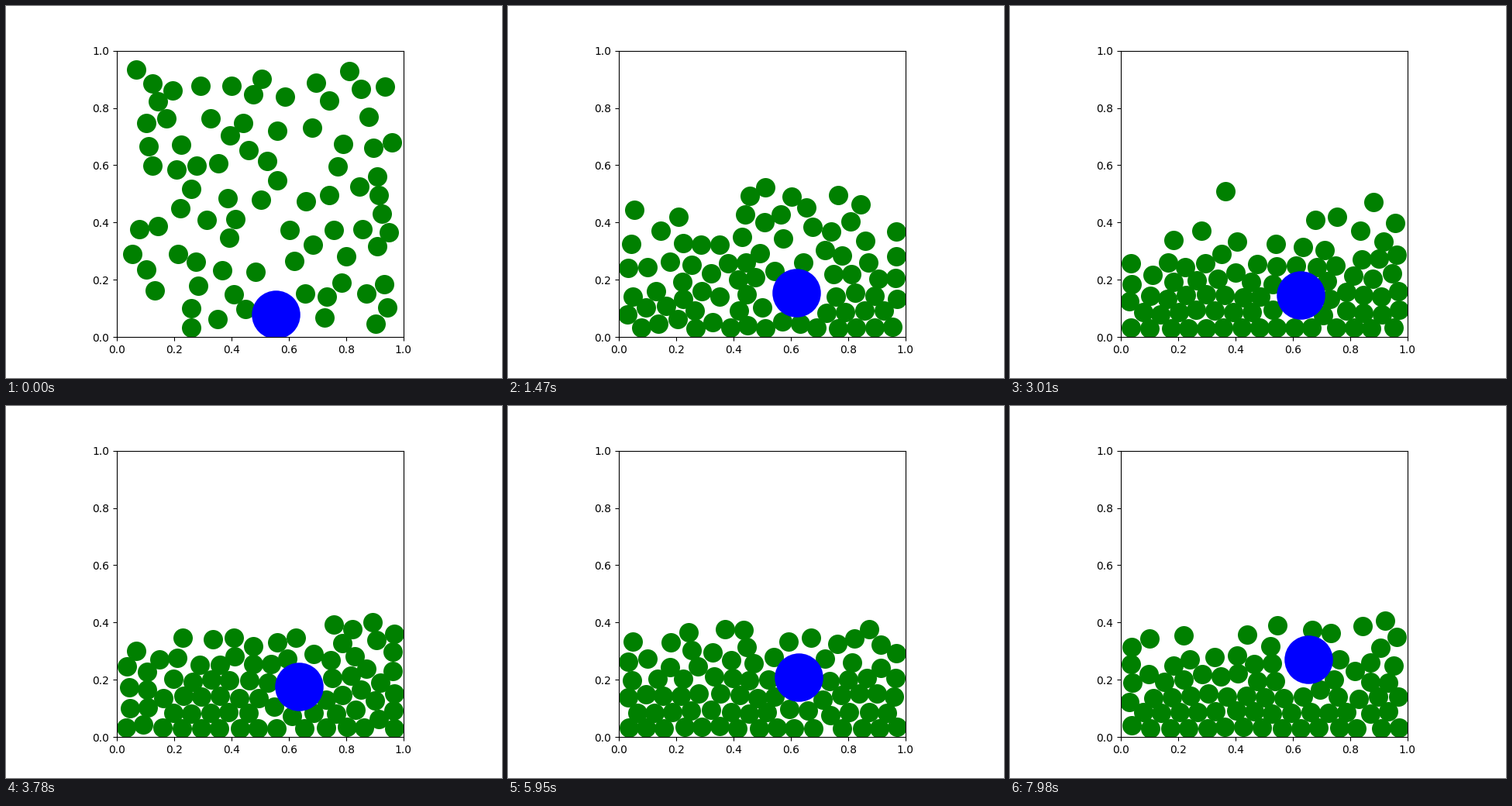
Animation of 640 by 480 pixels, one loop 8 s. Source, as a matplotlib script:

```python
import math

import numpy as np
import matplotlib.pyplot as plt
from matplotlib.animation import FuncAnimation

LOOP, TICK, HOLD = 8000, 20, 70      # ms: loop, timer, time per pose
POSES = LOOP // HOLD + 1
SUB = 10                             # physics substeps per pose
COUNT = 79                           # small balls
GRAVITY = 0.0031                     # box heights per pose squared
HEAT = 0.00011                       # mean squared speed the bed is kept at
LOSSY, LIVELY = 0.88, 1.08           # restitution of a hot and a cold bed
SMALL, BIG = 0.03, 0.075             # collision radii
CEILING = 0.94

# Climb of the big ball: pose, x, y
CLIMB = [(0, 0.555, 0.078), (21, 0.620, 0.154), (43, 0.626, 0.146),
         (65, 0.642, 0.208), (85, 0.628, 0.208), (101, 0.666, 0.270),
         (114, 0.653, 0.270)]


def big_ball(t):
    for (t0, x0, y0), (t1, x1, y1) in zip(CLIMB, CLIMB[1:]):
        if t <= t1:
            break
    u = min((t - t0) / (t1 - t0), 1)
    s = (1 - math.cos(math.pi * u)) / 2
    wobble = 0.004 * math.sin(6 * math.pi * u)
    return complex(x0 + (x1 - x0) * s, y0 + (y1 - y0) * s + wobble)


def scatter(rng, centre):
    """Random spots in the box that touch neither each other nor the big ball."""
    spots = []
    while len(spots) < COUNT:
        spot = complex(rng.uniform(0.045, 0.965), rng.uniform(SMALL, CEILING))
        free = all(abs(spot - other) > 2.05 * SMALL for other in spots)
        if free and abs(spot - centre) > SMALL + BIG:
            spots.append(spot)
    return spots


def bounce(p, v, low, high, e):
    """One coordinate of a ball between two walls."""
    if p < low:
        return low, abs(v) * e
    if p > high:
        return high, -abs(v) * e
    return p, v


def collide(p, v, reach, e):
    """Resolve touching pairs one after another; the big ball never yields."""
    z = np.array(p)
    gap = np.abs(z[:, None] - z[None, :])
    for i, j in np.argwhere(np.triu(gap < reach, 1)).tolist():
        d = p[i] - p[j]
        dist = abs(d)
        overlap = reach[i, j] - dist
        if overlap <= 0 or dist == 0:
            continue
        n = d / dist
        share = 0 if j == COUNT else 0.5
        p[i] += n * overlap * (1 - share)
        p[j] -= n * overlap * share
        speed = (n.conjugate() * (v[i] - v[j])).real
        if speed < 0:
            kick = -(1 + e) * speed * n
            v[i] += kick * (1 - share)
            v[j] -= kick * share


def simulate():
    rng = np.random.default_rng(4)
    p = scatter(rng, big_ball(0)) + [big_ball(0)]
    v = [complex(*rng.uniform(-0.02, 0.02, 2)) for _ in range(COUNT)] + [0j]
    radii = np.array([SMALL] * COUNT + [BIG])
    reach = radii[:, None] + radii[None, :]

    h = 1 / SUB
    poses = [np.array(p)]
    for k in range(1, (POSES - 1) * SUB + 1):
        for i in range(COUNT):
            v[i] -= 1j * GRAVITY * h
            p[i] += v[i] * h
        target = big_ball(k * h)
        v[COUNT] = (target - p[COUNT]) / h
        p[COUNT] = target

        # Collisions take energy from a hot bed and feed a cold one
        energy = sum(abs(w) ** 2 for w in v[:COUNT]) / COUNT
        e = LOSSY if energy > HEAT else LIVELY
        collide(p, v, reach, e)
        for i in range(COUNT):
            x, vx = bounce(p[i].real, v[i].real, SMALL, 1 - SMALL, e)
            y, vy = bounce(p[i].imag, v[i].imag, SMALL, CEILING, e)
            p[i], v[i] = complex(x, y), complex(vx, vy)
        if k % SUB == 0:
            poses.append(np.array(p))
    return poses


poses = simulate()

fig, ax = plt.subplots(figsize=(6.4, 4.8), dpi=100)
ax.set_aspect("equal")
ax.set_xlim(0, 1)
ax.set_ylim(0, 1)
greens, = ax.plot([], [], "o", color="green", ms=18, mew=0)
blue, = ax.plot([], [], "o", color="blue", ms=45, mew=0)


def draw(frame):
    pose = poses[min((frame * TICK + TICK // 2) // HOLD, POSES - 1)]
    greens.set_data(pose[:-1].real, pose[:-1].imag)
    blue.set_data(pose[-1:].real, pose[-1:].imag)
    return greens, blue


anim = FuncAnimation(fig, draw, frames=LOOP // TICK, interval=TICK,
                     init_func=lambda: draw(0), repeat=True, repeat_delay=0)
plt.show()
```
